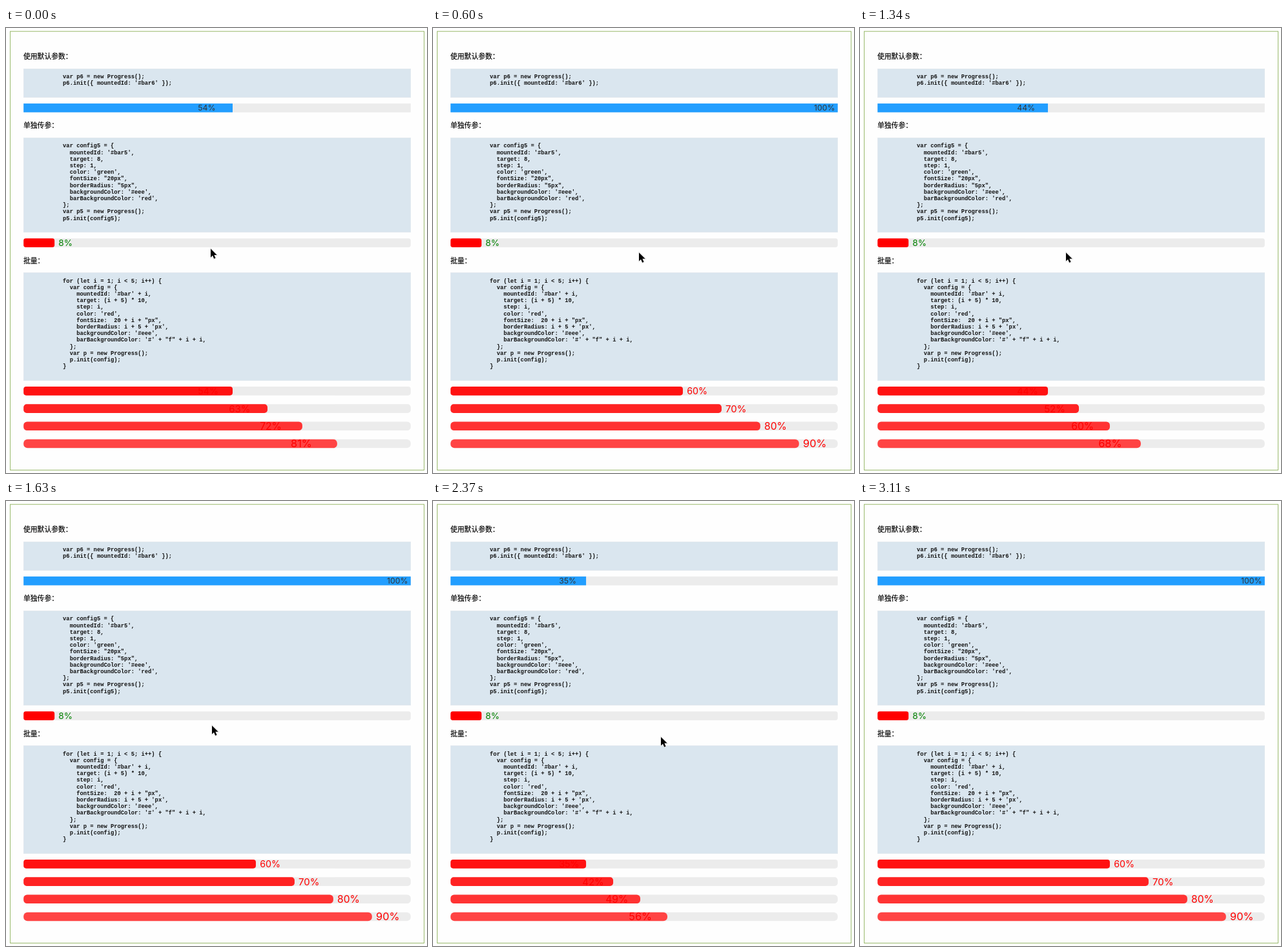
Recreate the animation shown at these times as an HTML page. Size 652 px wide and 690 px high, loop 3590 ms.

```html
<!DOCTYPE html>
<html lang="zh-CN">
<head>
<meta charset="utf-8">
<title>Progress</title>
<style>
html, body { margin: 0; width: 100%; height: 100%; overflow: hidden; background: #fff; }
#stage, .title, pre { position: absolute; }
#stage { left: 0; top: 0; }
.title { left: 27px; font: 500 10.8px/16px "Noto Sans CJK SC", "Noto Sans CJK", sans-serif; color: #000; -webkit-text-stroke: .2px #000; white-space: nowrap; }
pre { left: 27px; width: 600px; margin: 0; padding: 7.5px 0 0 7.3px; box-sizing: border-box; background: #dae6ef; border: 1px solid #e0e8ee;
  font: bold 8.8px/10.2px "Courier New", "Liberation Mono", monospace; color: #111; }
.label { font-family: Inter, sans-serif; }
</style>
</head>
<body>
<svg id="stage" width="652" height="690">
  <rect x="6.5" y="5.2" width="641" height="680.3" fill="#fefefe" stroke="#9aba6c"/>
</svg>
<div class="title" style="top:35.2px">使用默认参数：</div>
<pre style="top:62.5px;height:45.5px">
          var p6 = new Progress();
          p6.init({ mountedId: '#bar6' });</pre>
<div class="title" style="top:142.2px">单独传参：</div>
<pre style="top:169.8px;height:147.7px">
          var config5 = {
            mountedId: '#bar5',
            target: 8,
            step: 1,
            color: 'green',
            fontSize: "20px",
            borderRadius: "5px",
            backgroundColor: '#eee',
            barBackgroundColor: 'red',
          };
          var p5 = new Progress();
          p5.init(config5);</pre>
<div class="title" style="top:351.7px">批量：</div>
<pre style="top:379px;height:168px">
          for (let i = 1; i &lt; 5; i++) {
            var config = {
              mountedId: '#bar' + i,
              target: (i + 5) * 10,
              step: i,
              color: 'red',
              fontSize:  20 + i + "px",
              borderRadius: i + 5 + 'px',
              backgroundColor: '#eee',
              barBackgroundColor: '#' + "f" + i + i,
            };
            var p = new Progress();
            p.init(config);
          }</pre>
<svg style="position:absolute;left:0;top:0" width="652" height="690">
  <path id="cursor" d="M0 0V14.2L3.2 11.2L5.5 16.5L8 15.4L5.7 10.2H10.3Z" stroke="#fff" stroke-width="1.6" paint-order="stroke"
    style="filter:drop-shadow(0 .7px .6px rgba(0,0,0,.3))"/>
</svg>
<script>
const LOOP = 3590, SCALE = 0.68, LEFT = 27.2, WIDTH = 599.6, HEIGHT = 20 * SCALE, DONE = 99;
// [time, tick]: the bars jump to this tick of their accelerating run
const ticks = [[0, 9], [150, DONE], [1190, 3], [1340, 8], [1480, 13], [1630, DONE],
  [2220, 1], [2370, 7], [2520, 11], [2670, DONE]];
// [time, x, y] of the pointer tip
const tips = [[0, 317, 342.3], [450, 317.6, 344.1], [600, 319, 348.2], [2220, 338, 355.2], [2370, 353, 366],
  [2520, 467, 435.2], [2670, 572, 594], [2820, 571, 639], [2970, 600, 688], [3110, 600, 720]];

const stage = document.getElementById('stage');
const cursor = document.getElementById('cursor');

function add(tag, attrs) {
  const el = document.createElementNS('http://www.w3.org/2000/svg', tag);
  setAttrs(el, attrs);
  return stage.appendChild(el);
}

function setAttrs(el, attrs) {
  for (const name in attrs) el.setAttribute(name, attrs[name]);
}

function makeBar(y, target, step, color, fill, font, radius) {
  const box = { x: LEFT, y, height: HEIGHT, rx: radius * SCALE };
  add('rect', { ...box, width: WIDTH, fill: '#ececec' });
  const fillEl = add('rect', { ...box, fill });
  const size = font * SCALE;
  const label = add('text', { class: 'label', y: y + HEIGHT / 2 + size * 0.364, fill: color, 'font-size': size });
  return { target, step, fillEl, label };
}

const bars = [
  makeBar(117.1, 100, 1, '#333', '#229eff', 18, 0),
  makeBar(326.3, 8, 1, 'green', 'red', 20, 5)
];
for (let i = 1; i < 5; i++)
  bars.push(makeBar(528.9 + 27.2 * i, (i + 5) * 10, i, 'red', '#f' + i + i, 20 + i, i + 5));

// the step grows by one on every tick
const valueAt = (b, k) => Math.min(b.target, k * b.step + k * (k + 1) / 2);
const current = (list, t) => list.filter(e => e[0] <= t).pop();

function drawBar(b, k) {
  const value = valueAt(b, k), shown = valueAt(b, k - 1) + 1;
  const full = shown > 100;
  b.fillEl.setAttribute('width', value / 100 * WIDTH);
  b.label.textContent = value + '%';
  setAttrs(b.label, {
    x: full ? LEFT + WIDTH - 4.3 : LEFT + 0.2 + shown / 100 * WIDTH,
    'text-anchor': full ? 'end' : 'start'
  });
}

let lastTick;

function draw() {
  const t = performance.now() % LOOP;
  const k = current(ticks, t)[1];
  if (k !== lastTick) bars.forEach(b => drawBar(b, k));
  lastTick = k;
  const [, x, y] = current(tips, t);
  cursor.setAttribute('transform', `translate(${x} ${y}) scale(.94)`);
  requestAnimationFrame(draw);
}
draw();
</script>
</body>
</html>
```
